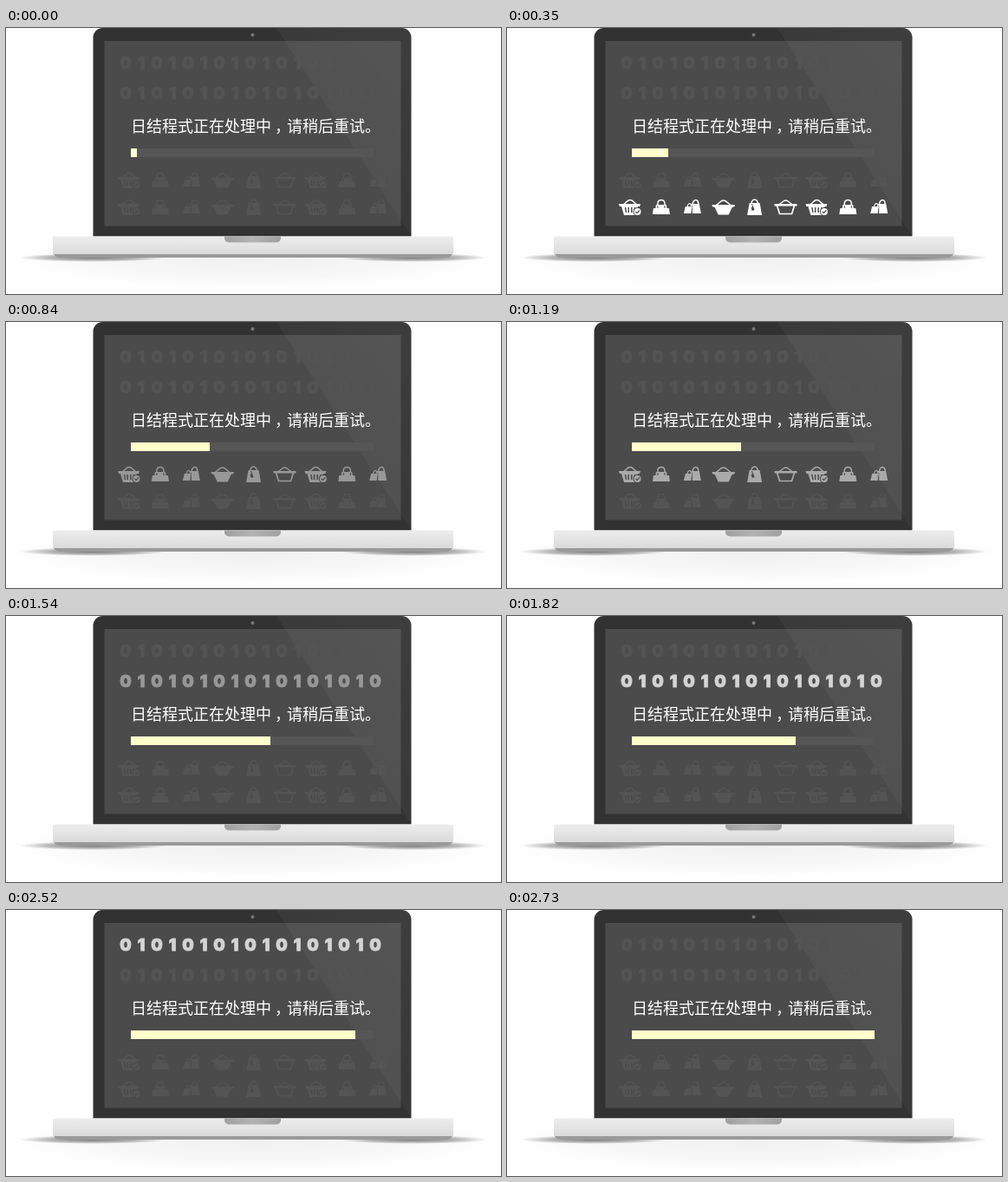
An HTML page with a canvas for the animation above (2800 ms loop, 571 by 307 pixels).

```html
<!DOCTYPE html>
<html lang="zh-CN">
<head>
<meta charset="utf-8">
<style>
html, body { margin: 0; width: 100%; height: 100%; overflow: hidden; background: #fff; }
canvas { display: block; }
</style>
</head>
<body>
<canvas id="stage" width="571" height="307"></canvas>
<script>
const ctx = document.getElementById('stage').getContext('2d');
const STEP = 70, STEPS = 40, ROW_STEPS = 10;
const SCREEN = '#4b4b4b', DIM = 84;

function rect(x, y, w, h, fill) {
  ctx.fillStyle = fill;
  ctx.fillRect(x, y, w, h);
}

function rounded(x, y, w, h, radii, fill) {
  ctx.fillStyle = fill;
  ctx.beginPath();
  ctx.roundRect(x, y, w, h, radii);
  ctx.fill();
}

function disc(x, y, r, fill) {
  ctx.fillStyle = fill;
  ctx.beginPath();
  ctx.arc(x, y, r, 0, Math.PI * 2);
  ctx.fill();
}

function fillPath(d, color) {
  ctx.fillStyle = color;
  ctx.fill(new Path2D(d));
}

function strokePath(d, color, width) {
  ctx.strokeStyle = color;
  ctx.lineWidth = width;
  ctx.stroke(new Path2D(d));
}

function gradient(x0, y0, x1, y1, ...colors) {
  const g = ctx.createLinearGradient(x0, y0, x1, y1);
  colors.forEach((c, i) => g.addColorStop(i / (colors.length - 1), c));
  return g;
}

function softEllipse(x, y, rx, ry, alpha) {
  ctx.save();
  ctx.translate(x, y);
  ctx.scale(rx, ry);
  const g = ctx.createRadialGradient(0, 0, 0, 0, 0, 1);
  g.addColorStop(0, `rgba(0,0,0,${alpha})`);
  g.addColorStop(0.6, `rgba(0,0,0,${alpha * 0.55})`);
  g.addColorStop(1, 'rgba(0,0,0,0)');
  disc(0, 0, 1, g);
  ctx.restore();
}

function drawLaptop() {
  rect(0, 0, 571, 307, '#fff');
  softEllipse(285, 266, 284, 36, 0.06);
  softEllipse(100, 265, 85, 5, 0.5);
  softEllipse(470, 265, 85, 5, 0.5);

  rounded(100.5, 0, 367, 240.5, [11, 11, 0, 0], '#323232');
  disc(284.5, 8, 2, '#777');
  rect(113.5, 15, 342, 213.5, SCREEN);

  ctx.save();
  ctx.beginPath();
  ctx.roundRect(100.5, 0, 367, 240.5, [11, 11, 0, 0]);
  ctx.clip();
  fillPath('M312 0H468V241Z',
    gradient(330, 150, 468, 30, 'rgba(255,255,255,.025)', 'rgba(255,255,255,.055)'));
  ctx.restore();

  rounded(54, 257, 462, 8, [0, 0, 8, 8], '#9a9a9a');
  rounded(54, 240.5, 462, 20.5, [2, 2, 2, 2],
    gradient(0, 241, 0, 261, '#ececec', '#e4e4e4', '#dadada'));
  rounded(252, 240.5, 65, 7, [0, 0, 5, 5], gradient(252, 0, 317, 0, '#a0a0a0', '#b2b2b2', '#a0a0a0'));
}

// Icons are drawn around their own centre, about 26 by 20 pixels.
function basket(c) {
  strokePath('M-9 -2L-2 -8Q0 -9 2 -8L9 -2', c, 1.5);
  fillPath('M-13 -4H12L11 -1H9L6 9H-7L-10 -1H-12Z', c);
  strokePath('M-5.5 0L-4.5 6M-1.8 0V6M1.8 0V6M5.5 0L4.5 6', SCREEN, 1.5);
  disc(8.5, 5, 5, SCREEN);
  disc(8.5, 5, 4, c);
  strokePath('M6.5 5L8 6.5L11 3.5', SCREEN, 1.2);
}

function handbag(c) {
  strokePath('M-4 -1V-5Q-3.5 -8.5 0 -8.5Q3.5 -8.5 4 -5V-1', c, 1.5);
  fillPath('M-6 -3H6L7.5 8H-7.5Z', c);
  fillPath('M-9 1H9L10 8H-10Z', c);
  strokePath('M-4 -2V1M4 -2V1', SCREEN, 1);
}

function twoBags(c) {
  strokePath('M0 -3Q1 -8.5 4 -8.5Q7 -8.5 7 -3', c, 1.5);
  fillPath('M-1 -4H8L10 7H-2Z', c);
  fillPath('M-8 -2H0L0 8H-10Z', SCREEN);
  strokePath('M-6 0Q-5 -4.5 -3 -4.5Q-1 -4 -1.5 0', c, 1.2);
  fillPath('M-8 -1H-.5L-1.5 7H-10Z', c);
}

function bowl(c) {
  strokePath('M-9 -2L-2 -7.5Q0 -8.5 2 -7.5L9 -2', c, 1.5);
  fillPath('M-13 -3H13V-1L10 0L6 8.5H-6L-10 0L-13 -1Z', c);
}

function tagBag(c) {
  strokePath('M-4 -3Q-3.5 -9 0 -9Q3.5 -9 4 -3', c, 1.5);
  fillPath('M-6 -5H6L8.5 9H-8.5Z', c);
  strokePath('M-3 -4L-2 0', SCREEN, 1);
  fillPath('M-4 0L-1.5 -1L0 3L-3 4Z', SCREEN);
}

function openBasket(c) {
  strokePath('M-8 -3L-2 -7.5Q0 -8.5 2 -7.5L8 -3', c, 1.4);
  fillPath('M-13 -4H13V-1.5H-13Z', c);
  strokePath('M-10 -2L-7 7.5H7L10 -2', c, 1.7);
}

const ICONS = [basket, handbag, twoBags, bowl, tagBag, openBasket];

function iconRow(y, color) {
  for (let i = 0; i < 9; i++) {
    ctx.save();
    ctx.translate(142 + i * 35.9, y);
    ICONS[i % ICONS.length](color);
    ctx.restore();
  }
}

function digitRow(baseline, color) {
  ctx.font = '900 19px Inter, "Liberation Sans", sans-serif';
  ctx.textAlign = 'center';
  ctx.fillStyle = ctx.strokeStyle = color;
  ctx.lineWidth = 0.8;
  for (let i = 0; i < 17; i++) {
    ctx.fillText(i % 2, 138 + i * 18, baseline);
    ctx.strokeText(i % 2, 138 + i * 18, baseline);
  }
}

// Each row lights up over five steps, then fades over four.
function rowColor(step, order) {
  const n = step - order * ROW_STEPS;
  const glow = Math.max(0, n <= 5 ? n / 5 : (9 - n) / 4);
  const v = Math.round(DIM + (255 - DIM) * glow);
  return `rgb(${v},${v},${v})`;
}

function drawMessage() {
  ctx.font = '18px "Noto Sans CJK SC", "Noto Sans CJK", sans-serif';
  ctx.textAlign = 'left';
  ctx.fillStyle = '#fff';
  ctx.fillText('日结程式正在处理中', 144, 120);
  ctx.fillText('，', 310, 120); // centred in its cell
  ctx.fillText('请稍后重试。', 324, 120);
}

function draw(step) {
  drawLaptop();
  digitRow(47, rowColor(step, 3));
  digitRow(82, rowColor(step, 2));
  iconRow(176, rowColor(step, 1));
  iconRow(207, rowColor(step, 0));
  drawMessage();
  rect(144, 139, 280, 10, '#565656');
  rect(144, 139, 7 * (step + 1), 10, '#ffffcc');
}

const start = performance.now();
function tick() {
  draw(Math.floor((performance.now() - start) / STEP) % STEPS);
  requestAnimationFrame(tick);
}
tick();
</script>
</body>
</html>
```
